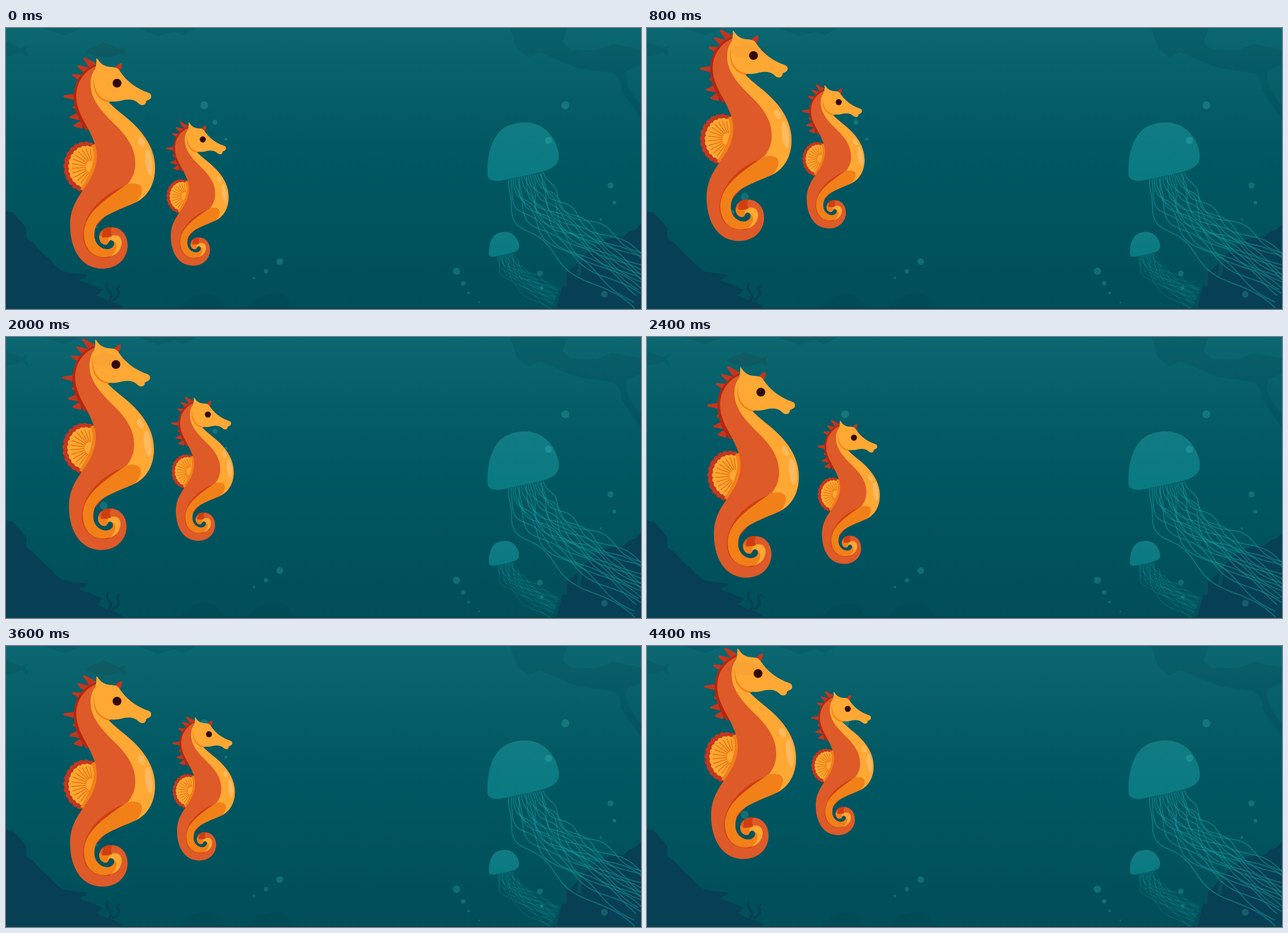
Animation, 1125 px wide and 498 px high, one loop 4.8 s. Source, as an HTML page:

```html
<!DOCTYPE html>
<html lang="en">
<head>
<meta charset="utf-8">
<title>Seahorses</title>
<style>
html, body { margin: 0; width: 100%; height: 100%; overflow: hidden; background: #00555f; }
svg { display: block; width: 100vw; height: 100vh; }
</style>
</head>
<body>
<svg viewBox="0 0 1125 498" preserveAspectRatio="none">
  <defs>
    <linearGradient id="water" x2="0" y2="1">
      <stop offset="0" stop-color="#0b6771"/>
      <stop offset=".25" stop-color="#055d67"/>
      <stop offset=".55" stop-color="#005660"/>
      <stop offset="1" stop-color="#004e59"/>
    </linearGradient>
    <linearGradient id="bell" x2="0" y2="1">
      <stop offset="0" stop-color="#127b84"/>
      <stop offset="1" stop-color="#087a82"/>
    </linearGradient>
    <path id="fish" d="M142 43Q150 32 164 31L172 25L188 32Q197 36 202 38L215 32L210 40L214 53L202 45Q178 60 142 43Z"/>
    <g id="jelly">
      <g id="arms" fill="none" stroke="#15949a" stroke-opacity=".55" stroke-width="2"/>
      <path fill="url(#bell)" d="M853 260C852 214 866 183 890 173C925 159 960 170 975 207C985 234 978 244 958 252C935 260 910 263 885 269C868 273 854 271 853 260Z"/>
    </g>
    <g id="horse">
      <g id="spikes" fill="#c3361f" stroke="#c3361f" stroke-width="4" stroke-linejoin="round"/>
      <path fill="#c3361f" d="M193 70Q200 62 205 62Q207 68 201 77Z"/>
      <g id="fin"/>
      <path fill="none" stroke="#b32711" stroke-width="11" d="M159 70C131 82 121 110 127 138C131 156 139 168 146 179"/>
      <path fill="none" stroke="#f28018" stroke-width="10" d="M156 206C165 228 160 252 136 288"/>
      <path fill="#de5a28" d="M160 67C131 80 120 108 126 135C131 158 146 175 154 197C161 212 164 230 157 250C148 283 113 302 113.500 350C114 395 135 426.500 171 426.500C199 426.500 215.500 407 215.500 385C215.500 366 203 353 187 353C175 353 167 359 165.500 367C163 376 170 384 177 384C182 384 181 376 187 376C192 377 193 383 190 387C185 394 174 393 167 388C156 380 154 367 159 352C165 336 186 326 212 316C246 304 264 281 264 248C264 205 233 174 206 153Q192 142 180 130Z"/>
      <path fill="#cf3e12" d="M226 276C190 282 143 315 137 360C134 390 151 409 184 407L190 395C160 400 150 380 153 359Z"/>
      <path fill="#ffa834" d="M160 70C152 80 150 88 150 100C150 128 172 150 192 170C216 193 229 214 229 240C229 255 224 268 212 281L230 309C252 298 264 276 264 248C264 205 233 174 206 153Q192 142 180 130Z"/>
      <path fill="#f28018" d="M214 277C225 274 237 275 240 282C243 290 238 302 230 309C194 325 167 333 159 352C154 367 156 380 167 388C174 393 185 394 190 387C193 383 192 377 187 376C181 376 182 384 177 384C168 384 164 376 165.500 367L173 371C181 371 187 367 195 367C202 367 205 374 205 380C205 397 191 406 174 406C153 406 138 390 138 365C138 326 180 302 214 277Z"/>
      <path fill="#ffa834" d="M187 368C198 366 205 371 205 381C204 391 198 400 187 404C197 394 201 382 187 376Q182 375 181 380Q180 372 187 368Z"/>
      <path fill="#cf3e12" d="M172 357Q178 352 188 353Q184 362 188 369Q180 372 170 371Q171 365 172 357Z"/>
      <path fill="#f28018" d="M158 78C150 105 158 127 182 132L187 130L168 110Z"/>
      <path fill="#ffa834" d="M160 53.500C164 55 166 64 176 67C185 71 196 66 202 77C212 92 229 107 253 115C258 117 258 122 256 125C252 129 247 128 248 132C246 138 239 138 234 133C227 126 216 126 207 128C197 131 188 131 181 129C164 124 157 110 156 94C155 80 161 70 160 53.500Z"/>
      <circle cx="196.700" cy="97.800" r="7.800" fill="#300606"/>
      <g fill="#ffb95e">
        <ellipse cx="240" cy="202" rx="5.500" ry="9" transform="rotate(-24 240 202)"/>
        <ellipse cx="253" cy="238" rx="6.500" ry="24" transform="rotate(-7 253 238)"/>
      </g>
    </g>
  </defs>

  <path fill="url(#water)" d="M0 0H1125V498H0Z"/>
  <g id="shade" fill="#003c48" fill-opacity=".16">
    <path d="M893 0L905 36L925 52L945 43L1012 71L1075 80Q1092 92 1090 111L1125 161V137Q1092 100 1100 76L1125 65V38L1075 28L1045 40L1000 38L986 25L995 0Z"/>
    <path d="M67 0L103 13L130 2V0ZM232 0L270 14L299 6L314 13L338 0Z"/>
    <use href="#fish"/>
    <use href="#fish" x="-175" y="-2"/>
  </g>
  <g id="rocks" fill="#073f54">
    <path fill="none" stroke="#073f54" stroke-width="4" stroke-linecap="round" d="M182 484Q190 476 183 468Q176 461 180 453M190 482Q203 475 199 466Q194 460 201 458"/>
  </g>
  <path fill="none" stroke="#074e5b" stroke-width="7" stroke-linecap="round" d="M1017 387Q1020 410 1015 436M990 432V454"/>
  <path fill="#06434f" d="M0 496H1125V498H0Z"/>
  <use href="#jelly"/>
  <use href="#jelly" transform="translate(855.500 361) scale(.425) translate(-853 -166.500)"/>
  <g id="bubbles" fill="#50e0d0" fill-opacity=".2"/>
  <use id="big" href="#horse"/>
  <use id="small" href="#horse"/>
  <use href="#fish" fill="#a04000" fill-opacity=".04"/>
</svg>
<script>
const $ = s => document.querySelector(s);
const NS = 'http://www.w3.org/2000/svg';
function add(parent, tag, attrs) {
  const el = document.createElementNS(NS, tag);
  for (const k in attrs) el.setAttribute(k, attrs[k]);
  $(parent).append(el);
}
let seed = 7;
const rnd = () => (seed = seed * 16807 % 2147483647) / 2147483647;
const lerp = (a, b, u) => a + (b - a) * u;
const bez = (a, b, c, d, u) => {
  const v = 1 - u;
  return a*v*v*v + 3*b*v*v*u + 3*c*v*u*u + d*u*u*u;
};
const polar = (x, y, rx, ry, deg) => {
  const a = deg * Math.PI / 180;
  return [x + rx * Math.cos(a), y + ry * Math.sin(a)];
};

// Rough outline through a few key points
function jagged(parent, rough, points) {
  let d = 'M' + points[0];
  points.slice(1).forEach(([x, y], i) => {
    const [px, py] = points[i];
    for (const u of [.33, .67])
      d += 'L' + [lerp(px, x, u) + (rnd() - .5) * rough, lerp(py, y, u) + (rnd() - .5) * rough];
    d += 'L' + [x, y];
  });
  add(parent, 'path', {d});
}
jagged('#rocks', 5, [[0, 498], [0, 325], [10, 326], [34, 352], [37, 374], [66, 400], [100, 431],
  [144, 437], [130, 448], [172, 464], [160, 473], [204, 492], [205, 498]]);
jagged('#rocks', 5, [[1125, 498], [1125, 347], [1094, 370], [1060, 375], [1030, 398], [990, 437], [975, 498]]);
for (const x of [302, 427])
  jagged('#shade', 9, [[x, 498], [x + 33, 474], [x + 65, 473], [x + 95, 498]]);

// Bubbles: x, y, radius, number of smaller ones trailing below
[[351, 137, 7, 2], [485, 414, 6, 2], [798, 431, 6.5, 3], [991, 137, 7, 0], [961, 199, 6.5, 0],
 [1071, 279, 5.5, 2], [946, 435, 5, 1], [1060, 472, 6, 0], [173, 299, 7, 2]
].forEach(([cx, cy, r, n]) => {
  for (; n >= 0; n--) {
    add('#bubbles', 'circle', {cx, cy, r});
    cx += (rnd() - .5) * 50;
    cy += 12 + rnd() * 20;
    r *= .62;
  }
});

// Spikes fan out along the back
[20, 19, 20, 8, 27, 9, 16, 11].forEach((len, i) => {
  const u = (i + .5) / 8, dir = 172 + 57 * (1 - u) ** 2;
  const x = bez(157, 128, 121, 133, u) + 2, y = bez(64, 78, 145, 178, u);
  const tip = polar(x, y, len, len, dir);
  add('#spikes', 'path', {d: `M${polar(x, y, 5, 5, dir + 90)}L${tip}L${polar(x, y, 5, 5, dir - 90)}Z`});
});

// Scalloped fin with rays
const rim = (deg, k) => polar(lerp(154, 141, k), 246, 37 * k, 43 * k, deg);
function fan(k, fill) {
  let d = 'M158 246L' + rim(85, k);
  for (let a = 85; a < 295; a += 15) d += 'Q' + rim(a + 7.5, k * 1.1) + ' ' + rim(a + 15, k);
  add('#fin', 'path', {d: d + 'Z', fill});
}
fan(1, '#c3361f');
fan(.84, '#ffa834');
for (let a = 100; a < 290; a += 15)
  add('#fin', 'path', {d: `M${rim(a, .25)}L${rim(a, .76)}`, stroke: '#e8740f', 'stroke-width': 1.8});

// Jellyfish arms: wavy strands between two border curves
const N = 17;
for (let i = 0; i < N; i++) {
  const start = i / (N - 1), end = lerp(start, (i * 7 % N) / (N - 1), .6);
  let d = '';
  for (let j = 0; j <= 48; j++) {
    const u = j / 48, s = lerp(start, end, Math.min(1, u * 1.5));
    const wave = 5.5 * Math.min(1, u * 4) * Math.sin(u * 15 + i * 1.9);
    const x = lerp(bez(891, 878, 965, 1110, u), bez(952, 985, 1040, 1150, u), s) + wave;
    const y = lerp(bez(268, 350, 400, 500, u), bez(256, 310, 340, 393, u), s) - wave;
    d += (j ? 'L' : 'M') + x.toFixed(1) + ' ' + y.toFixed(1);
  }
  add('#arms', 'path', {d});
}

// Four hops of three 400 ms poses: each rises from a low point [x, y] to a high one, by way of x = mid
const big = {mid: 0, low: [[0, 0], [4, -6], [5, 0], [0, 0]], high: [[-8, -49], [-2, -49], [0, -49], [0, -49]]};
const small = {mid: 6, low: [[0, 0], [4, -25], [18, -19], [11, -41]], high: [[-9, -66], [9, -60], [8, -82], [7, -86]]};
function pose({mid, low, high}, step) {
  const hop = Math.floor(step / 3), u = step % 3 / 2;
  const [x0, y0] = low[hop], [x1, y1] = high[hop];
  const x = u < .5 ? lerp(x0, mid, u * 2) : lerp(mid, x1, u * 2 - 1);
  return [x, lerp(y0, y1, 1 - (1 - u) ** 1.45)];
}
function draw(now) {
  const step = Math.floor(now % 4800 / 400);
  const [bx, by] = pose(big, step), [sx, sy] = pose(small, step);
  $('#big').setAttribute('transform', `translate(${bx} ${by})`);
  $('#small').setAttribute('transform', `translate(${278 + sx} ${165.5 + sy}) scale(.681) translate(-93 -51)`);
  requestAnimationFrame(draw);
}
draw(performance.now());
</script>
</body>
</html>
```
